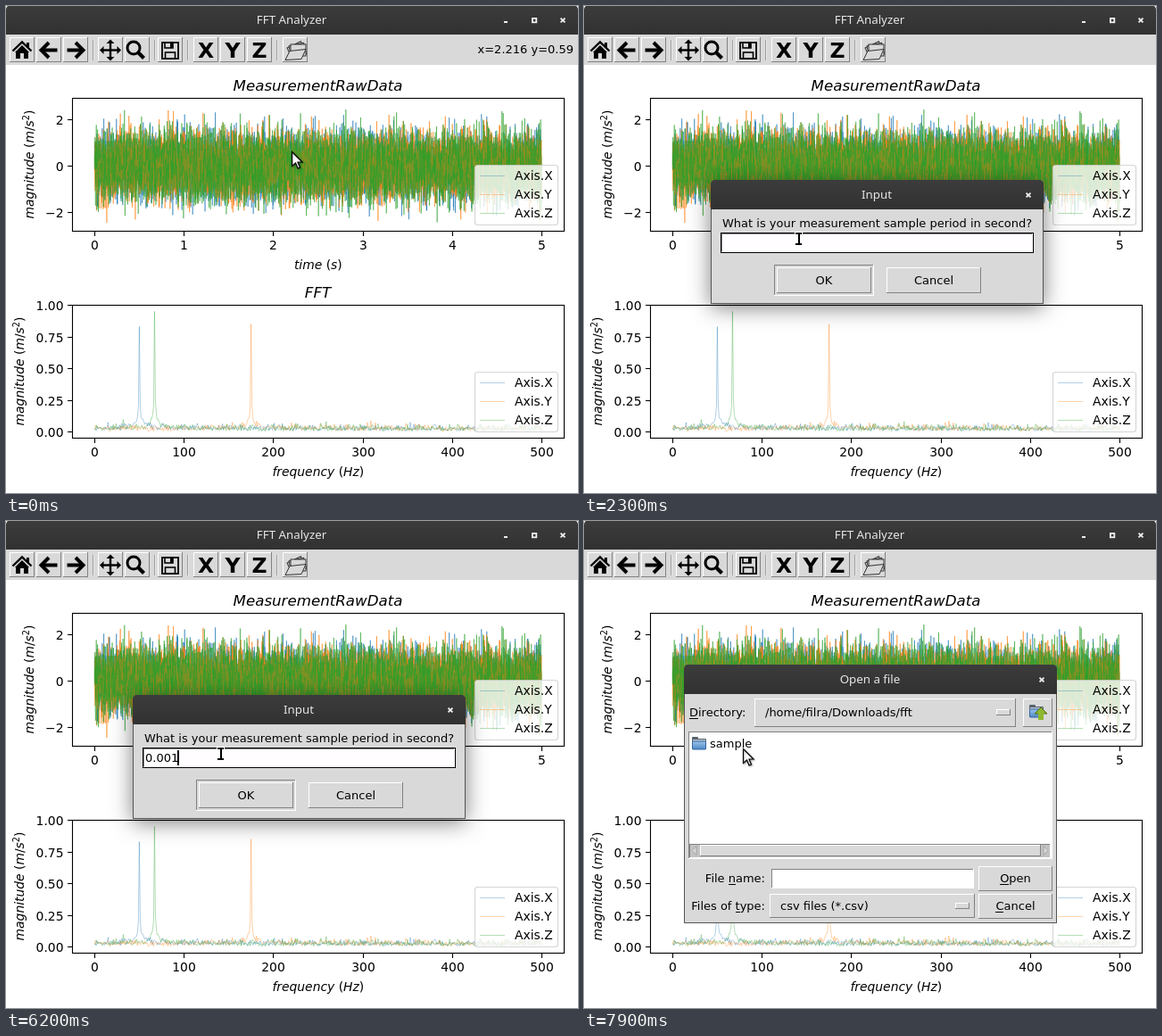
These frames come from a looping animation (641 by 546 pixels, 8 s). An HTML page with a canvas:

```html
<!DOCTYPE html>
<html lang="en">
<head>
<meta charset="utf-8">
<title>FFT Analyzer</title>
<style>
html, body { margin: 0; width: 100%; height: 100%; overflow: hidden; background: #fff; }
canvas { display: block; }
</style>
</head>
<body>
<canvas id="stage" width="641" height="546"></canvas>
<script>
const W = 641, H = 546, LOOP = 8000, TAU = Math.PI * 2;
const GRAY = '#d9d9d9', HOVER = '#ececec', COLORS = ['#1f77b4', '#ff7f0e', '#2ca02c'];
const SANS = '"DejaVu Sans", sans-serif', UI = '13px ' + SANS, PLOT = '13.89px ' + SANS;
const TITLE = '500 13.3px "Noto Sans", sans-serif';
const screen = document.getElementById('stage').getContext('2d');
let c = screen;

function newLayer() {
  const layer = document.createElement('canvas');
  layer.width = W;
  layer.height = H;
  return layer.getContext('2d');
}

// ---- drawing helpers ----
function rect(x, y, w, h, fill = '#000') {
  c.fillStyle = fill;
  c.fillRect(x, y, w, h);
}

function frame(x, y, w, h, width = 1, color = '#000') {
  c.strokeStyle = color;
  c.lineWidth = width;
  c.strokeRect(x, y, w, h);
}

function rounded(x, y, w, h, radius, fill) {
  c.beginPath();
  c.roundRect(x, y, w, h, radius);
  c.fillStyle = fill;
  c.fill();
}

function path(points, { fill, stroke, width = 1, close = true }) {
  c.beginPath();
  points.forEach(p => c.lineTo(p[0], p[1]));
  if (close) c.closePath();
  if (fill) { c.fillStyle = fill; c.fill(); }
  if (stroke) { c.strokeStyle = stroke; c.lineWidth = width; c.stroke(); }
}

const line = (points, width = 1, stroke = '#000') => path(points, { stroke, width, close: false });

// Run a drawing with its origin moved and turned by quarter turns
function placed(x, y, quarters, draw) {
  c.save();
  c.translate(x, y);
  c.rotate(quarters * Math.PI / 2);
  draw();
  c.restore();
}

// Triangle with its tip at x, y
const triangle = (x, y, quarters, size, style = { fill: '#000' }) =>
  placed(x, y, quarters, () => path([[0, 0], [size, size], [-size, size]], style));

function text(s, x, y, font = UI, align = 'left', color = '#000') {
  c.font = font;
  c.textAlign = align;
  c.fillStyle = color;
  c.fillText(s, x, y);
}

// Oblique letters with upright brackets and digits, ^ raises the next character
function mathText(s, x, y, size) {
  let offset = 0;
  const runs = s.match(/\^.|[a-z ]+|[^a-z^]/gi).map(run => {
    const raised = run[0] === '^', letters = run.replace('^', '');
    const font = `${/[a-z]/i.test(run) ? 'italic ' : ''}${size * (raised ? .7 : 1)}px ${SANS}`;
    c.font = font;
    const item = [letters, offset, raised ? -.38 * size : 0, font];
    offset += c.measureText(letters).width;
    return item;
  });
  runs.forEach(([letters, dx, dy, font]) => text(letters, x + dx - offset / 2, y + dy, font));
}

// Label with the character at index u underlined
function keyed(s, x, y, align, u) {
  text(s, x, y, UI, align);
  const width = n => c.measureText(s.slice(0, n)).width;
  const left = x - width(s.length) * { left: 0, center: .5, right: 1 }[align];
  if (u >= 0) rect(Math.round(left + width(u)), y + 2, Math.round(width(u + 1) - width(u)), 1);
}

function bevel(x, y, w, h, fill = GRAY, sunken = false) {
  const [light, dark] = sunken ? ['#828282', '#fff'] : ['#fff', '#828282'];
  rect(x, y, w, h, dark);
  rect(x, y, w - 1, h - 1, light);
  rect(x + 1, y + 1, w - 2, h - 2, fill);
}

function button(label, x, y, w, h, underline = -1, fill = GRAY, down = 0) {
  bevel(x, y, w, h, fill, down);
  keyed(label, x + w / 2 + down, Math.round(y + h / 2 + 4) + 2 * down, 'center', underline);
}

function menu(label, x, y, w, h) {
  bevel(x, y, w, h);
  text(label, x + 12, Math.round(y + h / 2 + 4));
  bevel(x + w - 22, Math.round(y + h / 2 - 4), 16, 7);
}

function titleBar(x, y, w, name) {
  const g = c.createLinearGradient(0, y, 0, y + 33);
  g.addColorStop(0, '#3c3c3c');
  g.addColorStop(1, '#313131');
  rounded(x, y, w, 33, [5, 5, 0, 0], g);
  text(name, x + w / 2 - .5, y + 21, TITLE, 'center', '#e6e6e6');
  placed(x + w - 17, y + 17, .5, () => {
    rect(-3.5, -.9, 7, 1.8, '#eee');
    rect(-.9, -3.5, 1.8, 7, '#eee');
  });
}

// ---- plots ----
let seed = 11;
function random() {
  seed = (seed * 1664525 + 1013904223) % 4294967296;
  return (seed + .5) / 4294967296;
}
const gauss = () => Math.sqrt(-2 * Math.log(random())) * Math.cos(TAU * random());
const range = n => [...Array(n).keys()];

function axes(y, title, xLabel, yLabelX, xStep, yLabels, yZero, yStep) {
  frame(74.5, y + .5, 551, 149, 1.1);
  for (const i of range(6)) {
    const x = Math.round(99 + i * 100.2) + .5;
    line([[x, y + 150], [x, y + 155]], 1.1);
    text(i * xStep, x, y + 170, PLOT, 'center');
  }
  yLabels.forEach((label, i) => {
    const ty = Math.round(yZero - i * yStep);
    line([[69, ty + .5], [74, ty + .5]], 1.1);
    text(label, 64.5, ty + 5.5, PLOT, 'right');
  });
  mathText(title, 349.5, y - 8, 16.67);
  mathText(xLabel, 349.8, y + 192, 13.89);
  placed(yLabelX, y + 74.5, -1, () => mathText('magnitude (m/s^2)', 0, 0, 13.89));
}

function legend(y) {
  rounded(525.5, y + .5, 93, 67, 3, 'rgba(255,255,255,.8)');
  c.strokeStyle = 'rgba(204,204,204,.8)';
  c.lineWidth = 1.2;
  c.stroke();
  COLORS.forEach((color, i) => {
    const ly = y + 12 + i * 21;
    line([[531, ly + .5], [559, ly + .5]], .35, color);
    text('Axis.' + 'XYZ'[i], 570, ly + 5, PLOT);
  });
}

function signal(freq, amp, color) {
  const wave = range(5000).map(n => {
    const v = amp * Math.sin(TAU * freq * n / 1000) + .5 * gauss();
    return [99.3 + n * .1002, 179.5 - v * 26.1];
  });
  const spectrum = range(501).map(f => {
    const d = Math.abs(f - freq), noise = .021 * Math.hypot(gauss(), gauss());
    return [99.3 + f * 1.002, 477.3 - 142 * (d ? noise + amp / (1 + 4 * d) : amp)];
  });
  line(wave, .55, color);
  line(spectrum, .36, color);
}

function plots() {
  c.lineJoin = 'bevel';
  signal(50, .83, COLORS[0]);
  signal(175, .85, COLORS[1]);
  signal(67, .95, COLORS[2]);
  c.lineJoin = 'miter';
  axes(103, 'MeasurementRawData', 'time (s)', 31, 1, ['−2', '0', '2'], 231, 52);
  axes(335, 'FFT', 'frequency (Hz)', 20, 100, range(5).map(i => (i / 4).toFixed(2)), 477, 35.5);
  legend(178);
  legend(410);
}

// ---- main window ----
function folderButton(fill, sunken) {
  bevel(310, 35, 28, 28, fill, sunken);
  const style = { fill, stroke: '#333' };
  for (const i of range(3))
    placed(315 + i * 2, 47 - i * 2, -.28 + i * .14, () => {
      rect(0, 0, 17, 13, fill);
      frame(0, 0, 17, 13, 1, '#333');
    });
  path([[313, 60.5], [318, 50.5], [336, 48.5], [331, 59.5]], style);
}

function arrow(x, quarters) {
  placed(x, 49.5, quarters, () => {
    line([[0, -8], [0, 9.5]], 4);
    line([[-8.5, 0], [0, -8.5], [8.5, 0]], 4);
  });
}

function home(x, y) {
  triangle(x, y - 6, 0, 8);
  rect(x - 7, y + 1, 14, 8);
  rect(x - 2, y + 3, 4, 6, GRAY);
  rect(x + 5, y - 9, 3, 6);
  line([[x - 10.5, y + .5], [x, y - 9.5], [x + 10.5, y + .5]], 2.4);
}

function magnifier(x, y) {
  c.beginPath();
  c.arc(x, y, 7, 0, TAU);
  c.lineWidth = 3;
  c.stroke();
  line([[x + 5, y + 5], [x + 11.5, y + 11.5]], 4.2);
}

function floppy(x, y) {
  frame(x - 9, y - 9, 18, 18, 1.8);
  frame(x - 5.5, y + 2, 11, 7, 1.6);
  frame(x - 6, y - 9, 9, 6, 1.6);
  rect(x, y - 9, 3, 6);
}

function toolbar() {
  rect(0, 32, W, 34, GRAY);
  const groups = [[4, 3], [103, 2], [170, 1], [210, 3]];
  for (const [x, count] of groups) {
    for (const i of range(count)) bevel(x + 30 * i, 35, 28, 28);
    const gap = x + 30 * count + 3;
    rect(gap, 38, 1, 23, '#a0a0a0');
    rect(gap + 1, 38, 1, 23, '#e8e8e8');
  }
  home(18, 50);
  arrow(48, -1);
  arrow(78, 1);
  for (const i of range(4))
    placed(117, 49.5, i, () => {
      rect(-1.2, -9, 2.4, 9);
      triangle(0, -12, 0, 4.5);
    });
  magnifier(143, 47);
  floppy(184, 50);
  [...'XYZ'].forEach((s, i) => text(s, 224 + 30 * i, 58, 'bold 23.5px ' + SANS, 'center'));
  folderButton(GRAY);
}

function mainWindow() {
  rect(0, 0, W, H, '#fff');
  titleBar(0, -1, W, 'FFT Analyzer');
  rect(558, 17, 4, 2, '#eee');
  frame(589.9, 13.9, 4.4, 4.4, 1.8, '#eee');
  toolbar();
  plots();
}

// ---- dialogs ----
function dialog(x, y, w, h, name, shadow) {
  c.save();
  c.shadowColor = `rgba(0,0,0,${shadow})`;
  c.shadowBlur = 24;
  c.shadowOffsetY = 4;
  rounded(x, y, w, h, [5, 5, 0, 0], '#555');
  c.restore();
  rect(x + 1, y + 32, w - 2, h - 33, GRAY);
  titleBar(x, y, w, name);
}

function inputDialog(value, caret, okFill, okDown) {
  dialog(142, 195, 373, 139, 'Input', .5);
  text('What is your measurement sample period in second?', 155, 248);
  rect(153, 254, 351, 23);
  bevel(154, 255, 349, 21, '#fffdff', true);
  text(value, 156, 270);
  if (caret) rect(155 + Math.round(c.measureText(value).width), 257, 2, 17);
  bevel(213, 290, 112, 35, GRAY, true);
  button('OK', 216, 293, 106, 29, -1, okFill, okDown);
  button('Cancel', 339, 293, 106, 29);
}

function folder(x, y) {
  rounded(x, y, 7, 5, 1, '#58636e');
  rounded(x, y + 2, 16, 12, 1, '#58636e');
  rounded(x + 1, y + 3, 14, 4, 0, '#b9c3ce');
  const g = c.createLinearGradient(0, y + 5, 0, y + 14);
  g.addColorStop(0, '#9cc4ea');
  g.addColorStop(1, '#4d88c4');
  rounded(x + .5, y + 5, 15, 9, 1, g);
  c.strokeStyle = '#3465a4';
  c.lineWidth = 1;
  c.stroke();
}

function fileDialog() {
  dialog(112, 161, 418, 290, 'Open a file', 0);
  keyed('Directory:', 118, 219, 'left', 0);
  menu('/home/filra/Downloads/fft', 191, 199, 293, 32);
  bevel(492, 199, 33, 32);
  folder(499, 206);
  triangle(512, 209, 0, 7, { fill: '#8db830', stroke: '#4e6b12' });
  rect(509, 215, 6, 8, '#8db830');

  bevel(117, 236, 408, 143, '#fff', true);
  folder(121, 242);
  text('sample', 141, 254);
  bevel(118, 362, 405, 16, '#c3c3c3', true);
  bevel(130, 363, 382, 13);
  const tip = { fill: GRAY, stroke: '#a3a3a3' };
  triangle(121, 369.5, -1, 5, tip);
  triangle(520, 369.5, 1, 5, tip);

  keyed('File name:', 203, 405, 'right', 5);
  bevel(210, 390, 227, 22, '#fff', true);
  button('Open', 442, 387, 83, 28, 0);
  keyed('Files of type:', 203, 436, 'right', 9);
  menu('csv files (*.csv)', 208, 418, 230, 27);
  button('Cancel', 442, 418, 83, 28, 0);
}

// Draw a window as one layer, scaled about cx, cy and partly transparent
const layer = newLayer();
function fading(cx, cy, scale, alpha, draw) {
  layer.clearRect(0, 0, W, H);
  c = layer;
  draw();
  c = screen;
  c.save();
  c.globalAlpha = alpha;
  c.translate(cx, cy);
  c.scale(scale, scale);
  c.drawImage(layer.canvas, -cx, -cy);
  c.restore();
}

// ---- pointer ----
// Moves: start time, end time, destination
const moves = [
  [100, 800, 317, 19], [800, 1000, 319, 42], [1900, 2300, 240, 261],
  [6400, 6800, 261, 292], [7700, 7900, 178, 255]
];

function pointerAt(t) {
  let x = 320, y = 163;
  for (const [from, to, toX, toY] of moves) {
    const u = Math.min(1, Math.max(0, (t - from) / (to - from)));
    const k = u * u * (3 - 2 * u);
    x += (toX - x) * k;
    y += (toY - y) * k;
  }
  return [Math.round(x), Math.round(y)];
}

function pointer(x, y) {
  placed(x + .5, y + .5, 0, () => {
    c.shadowColor = 'rgba(0,0,0,.3)';
    c.shadowBlur = 2;
    c.shadowOffsetX = c.shadowOffsetY = 1;
    path([[0, 0], [0, 16], [4, 12.5], [6.5, 18.5], [9, 17.5], [6.5, 11.5], [11.5, 11.5]],
      { fill: '#fff', stroke: '#000', width: 1.2 });
  });
}

function textPointer(x, y) {
  for (const [grow, color] of [[1, '#fff'], [0, '#000']]) {
    const bar = (dx, dy, w, h) => rect(x + dx - grow, y + dy - grow, w + 2 * grow, h + 2 * grow, color);
    bar(-3, -7, 7, 2);
    bar(0, -6, 2, 12);
    bar(-3, 5, 7, 2);
  }
}

// ---- playback ----
const back = newLayer();
c = back;
mainWindow();
c = screen;

const keyTimes = [3800, 4700, 5200, 5500, 5800];

function draw(now) {
  const t = Math.floor(now % LOOP / 100) * 100;
  const [x, y] = pointerAt(t);
  const inputOpen = t >= 1700 && t < 7200;
  c.drawImage(back.canvas, 0, 0);

  if (t < 1700 && x >= 310 && x < 338 && y >= 35 && y < 63) folderButton(HOVER, t === 1500);
  if (t < 1000 && y >= 103) {
    const px = (x - 98) / 100.2, py = (178.4 - y) / 26.1;
    text(`x=${px.toFixed(3)} y=${py.toPrecision(2)}`, 636, 53, UI, 'right');
  }

  if (inputOpen) {
    const value = '0.001'.slice(0, keyTimes.filter(k => k <= t).length);
    const caret = (t - 1700) % 900 < 600;
    inputDialog(value, caret, t >= 6700 ? HOVER : GRAY, t >= 7100 ? 1 : 0);
  } else if (t === 7200) {
    fading(328, 264, .94, .05, () => inputDialog('0.001', false, HOVER, 0));
    fading(321, 306, .986, .8, fileDialog);
  } else if (t > 7200) {
    fileDialog();
  }

  const overEntry = inputOpen && x > 153 && x < 504 && y > 254 && y < 277;
  (overEntry ? textPointer : pointer)(x, y);
}

const start = performance.now();
function tick() {
  draw(performance.now() - start);
  requestAnimationFrame(tick);
}
tick();
</script>
</body>
</html>
```
